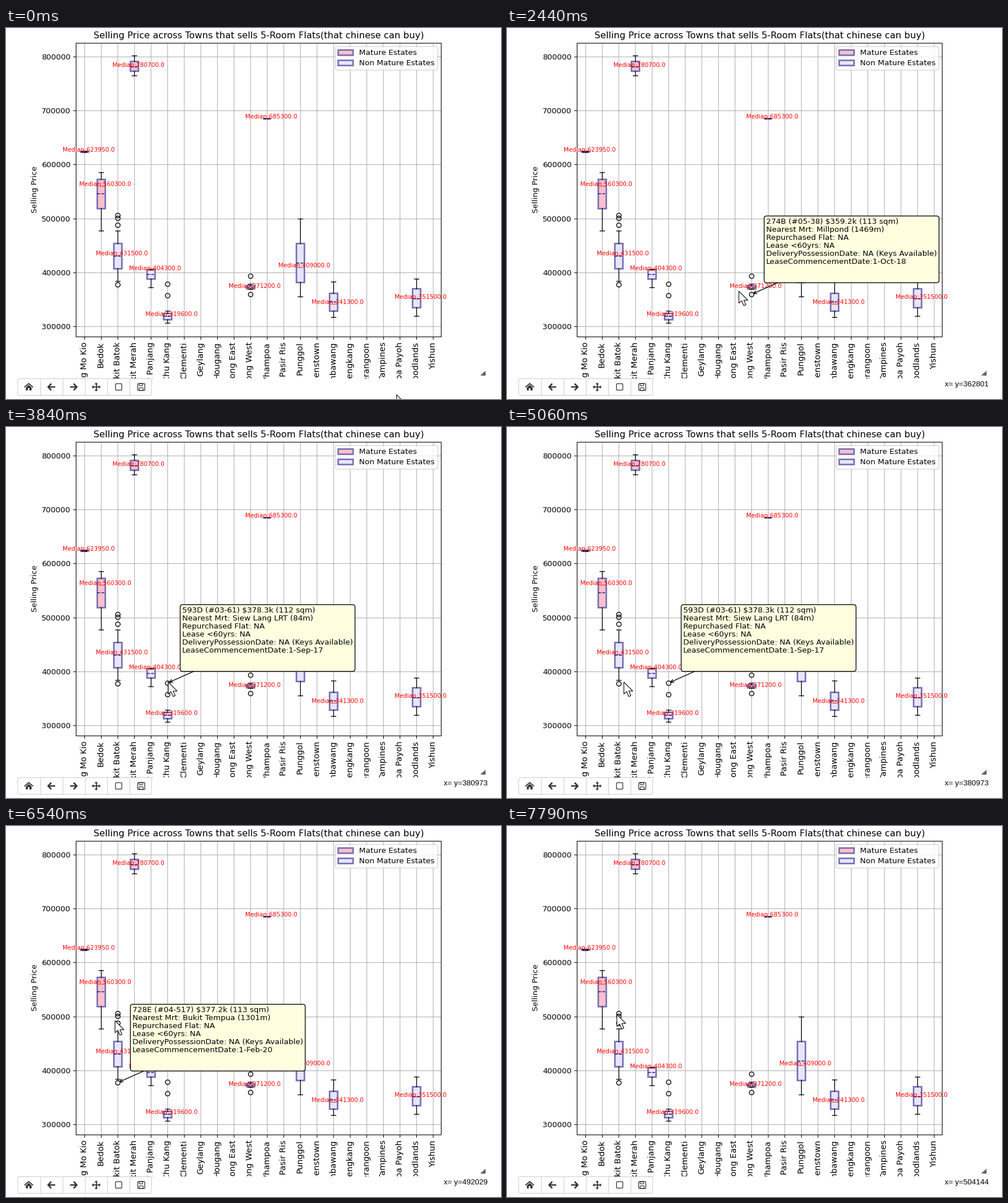
These frames come from a looping animation (865x648 px, 8 s). A matplotlib script:

```python
import numpy as np
import matplotlib.pyplot as plt
from matplotlib.animation import FuncAnimation
from matplotlib.patches import Circle, FancyBboxPatch, Patch, Polygon, Rectangle

W, H, DPI = 865, 648, 96
STEP, FRAMES = 80, 100
PX = 72 / DPI  # points per pixel
EDGE, DARK = "#7570b3", "#333333"

plt.rcParams["font.family"] = "DejaVu Sans"

TOWNS = ["Ang Mo Kio", "Bedok", "Bukit Batok", "Bukit Merah", "Bukit Panjang",
         "Choa Chu Kang", "Clementi", "Geylang", "Hougang", "Jurong East",
         "Jurong West", "Kallang/Whampoa", "Pasir Ris", "Punggol", "Queenstown",
         "Sembawang", "Sengkang", "Serangoon", "Tampines", "Toa Payoh",
         "Woodlands", "Yishun"]
MATURE = {"Ang Mo Kio", "Bedok", "Bukit Merah", "Kallang/Whampoa"}

# lowest, median and highest price in thousands, then any outliers
PRICES = {
    "Ang Mo Kio": (623, 623.95, 625),
    "Bedok": (477, 560.3, 585.5),
    "Bukit Batok": (384, 431.5, 477, 506.5, 501, 488, 377.2),
    "Bukit Merah": (765, 780.7, 802),
    "Bukit Panjang": (372, 404.3, 406.5),
    "Choa Chu Kang": (307, 319.6, 329, 378.3, 357),
    "Jurong West": (369, 371.2, 379, 394, 359.2),
    "Kallang/Whampoa": (685.2, 685.3, 685.4),
    "Punggol": (355, 409, 500),
    "Sembawang": (317, 341.3, 382.5),
    "Woodlands": (319.5, 351.5, 388),
}

# the pointer clicks a marker, and its note opens a little later
NOTES = [
    (1550, 1770, "Jurong West", 359.2, "274B (#05-38)", 113, "Millpond (1469m)", "1-Oct-18"),
    (3440, 3840, "Choa Chu Kang", 378.3, "593D (#03-61)", 112, "Siew Lang LRT (84m)", "1-Sep-17"),
    (5370, 5760, "Bukit Batok", 377.2, "728E (#04-517)", 113, "Bukit Tempua (1301m)", "1-Feb-20"),
]
CLICKS = [note[0] for note in NOTES] + [7500]

# pointer moves: from time, to time, resting place
START = (682, 640)
MOVES = [
    (70, 860, (438, 464)),
    (1060, 1300, (429, 462)),
    (2336, 2960, (283, 445)),
    (4420, 5140, (196.5, 445)),
    (6100, 6440, (190, 339.6)),
    (6640, 7090, (199, 333)),
    (7290, 7430, (191.5, 328.7)),
]


def pointer(t):
    pos = np.array(START, float)
    for begin, end, goal in MOVES:
        pos += (goal - pos) * np.clip((t - begin) / (end - begin), 0, 1)
    return pos


def status(t):
    y = pointer(t - STEP)[1]  # the readout lags one step behind
    if y > 539:
        return ""
    rows = round((463.7 - y) / 0.952)
    return f"x= y={360781.6 + 1009.592 * rows:.0f}"


fig = plt.figure(figsize=(W / DPI, H / DPI), dpi=DPI, facecolor="white")


def box_stats(low, med, high, *fliers):
    q1, q3 = (low + med) / 2, (med + high) / 2
    values = dict(whislo=low, q1=q1, med=med, mean=(q1 + q3) / 2, q3=q3, whishi=high)
    stats = {key: v * 1e3 for key, v in values.items()}
    return stats | {"fliers": [f * 1e3 for f in fliers]}


def draw_chart():
    ax = fig.add_axes([122.4 / W, 109 / H, 638 / W, 513.4 / H])
    places = [TOWNS.index(town) + 1 for town in PRICES]
    stats = [box_stats(*row) for row in PRICES.values()]
    parts = ax.bxp(stats, positions=places, widths=0.5, patch_artist=True,
                   showmeans=True, meanline=True, manage_ticks=False,
                   boxprops=dict(edgecolor=EDGE, linewidth=2),
                   medianprops=dict(color="tomato", linewidth=1),
                   meanprops=dict(color="navy", linestyle="--", linewidth=1))
    for town, x, row, box in zip(PRICES, places, stats, parts["boxes"]):
        box.set_facecolor("pink" if town in MATURE else "lavender")
        ax.text(x + 0.25, row["med"], f"Median:{row['med']:.1f}", color="red",
                size=7.8, ha="center", zorder=4)

    ax.set(xlim=(0.5, 22.5), ylim=(281100, 825700), ylabel="Selling Price")
    ax.set_xticks(range(1, 23), TOWNS, rotation=90, size=10.8)
    ax.set_yticks(range(300000, 800001, 100000))
    ax.set_title("Selling Price across Towns that sells 5-Room Flats"
                 "(that chinese can buy)", size=12)
    ax.grid(True)
    keys = [Patch(facecolor=c, edgecolor=EDGE, linewidth=2, label=name)
            for c, name in (("pink", "Mature Estates"), ("lavender", "Non Mature Estates"))]
    ax.legend(handles=keys, loc="upper right", labelspacing=0.37, borderpad=0.36)
    return ax


chart = draw_chart()

# pixel-space layer for everything above the chart
top = fig.add_axes([0, 0, 1, 1], zorder=10)
top.set(xlim=(0, W), ylim=(H, 0))
top.axis("off")


def stroke(xs, ys, width=1.0, color=DARK):
    top.plot(xs, ys, color=color, lw=width * PX, solid_capstyle="butt",
             solid_joinstyle="miter", zorder=3)


def shape(points):
    top.add_patch(Polygon(points, closed=True, fc=DARK, ec="none", zorder=3))


def rounded(x, y, w, h, r, **style):
    return top.add_patch(FancyBboxPatch((x, y), w, h, **style,
                                        boxstyle=f"round,pad=0,rounding_size={r}"))


def frame(x, y, w, h, width):
    rounded(x, y, w, h, 1.5, fc="none", ec=DARK, lw=width * PX, zorder=3)


def home_icon(x, y):
    stroke([x - 7.5, x, x + 7.5], [y + 0.5, y - 6, y + 0.5], 1.8)
    shape([(x - 5, y + 1), (x, y - 3.6), (x + 5, y + 1), (x + 5, y + 6), (x - 5, y + 6)])
    top.add_patch(Rectangle((x - 1.4, y + 2), 2.8, 4.2, fc="white", zorder=3.5))


def arrow_icon(x, y, d):
    stroke([x - 6.5 * d, x + 5 * d], [y, y], 2.4)
    stroke([x, x + 5.3 * d, x], [y - 5.8, y, y + 5.8], 2.6)


def pan_icon(x, y):
    for dx, dy in ((1, 0), (-1, 0), (0, 1), (0, -1)):
        stroke([x, x + 5 * dx], [y, y + 5 * dy], 1.8)
        shape([(x + 7.8 * dx, y + 7.8 * dy),
               (x + 4.6 * dx + 3 * dy, y + 4.6 * dy + 3 * dx),
               (x + 4.6 * dx - 3 * dy, y + 4.6 * dy - 3 * dx)])


def zoom_icon(x, y):
    frame(x - 5.5, y - 5.7, 11, 11.2, 1.3)


def save_icon(x, y):
    frame(x - 6, y - 6, 12.3, 12.2, 1.3)
    frame(x - 3.5, y - 6, 6, 4, 1.2)
    frame(x - 3.5, y + 1.5, 7, 4.7, 1.2)


def draw_toolbar():
    top.add_patch(Rectangle((0, 611.5), W, 40, fc="white", ec="none", zorder=1))
    stroke([0, W], [647.5, 647.5], 1, "#b8b8b8")
    rounded(20.5, 612.5, 234, 29, 3, fc="white", ec="#cccccc", lw=PX, zorder=2)
    icons = [home_icon, lambda x, y: arrow_icon(x, y, -1), lambda x, y: arrow_icon(x, y, 1),
             pan_icon, zoom_icon, save_icon]
    for k, icon in enumerate(icons):
        icon(39.7 + 39.3 * k, 627)
        if k:
            x = 20.5 + 39 * k
            stroke([x, x], [612.5, 641.5], 1, "#cccccc")
    for d in (0, 3, 5.5):  # resize grip
        stroke([830 + d, 838], [607, 600 + 0.9 * d], 1.5)


def make_note(town, price, flat, area, station, lease):
    x, y = chart.transData.transform((TOWNS.index(town) + 1, price * 1e3))
    y = H - y
    lines = [f"{flat} ${price}k ({area} sqm)", f"Nearest Mrt: {station}",
             "Repurchased Flat: NA", "Lease <60yrs: NA",
             "DeliveryPossessionDate: NA (Keys Available)", f"LeaseCommencementDate:{lease}"]
    arrow = top.annotate("", xy=(x, y), xytext=(x + 46, y - 20.5), zorder=4,
                         arrowprops=dict(arrowstyle="->", shrinkA=0, shrinkB=2,
                                         mutation_scale=10, lw=1))
    box = rounded(x + 22.5, y - 137, 305.5, 116.5, 4,
                  fc="lightyellow", ec="black", lw=1, zorder=5)
    texts = [top.text(x + 26, y - 123 + 13.85 * k, line, size=10, zorder=6)
             for k, line in enumerate(lines)]
    return [arrow, box, *texts]


draw_toolbar()
notes = [make_note(*row[2:]) for row in NOTES]
readout = top.text(842, 626.3, "", family="Liberation Sans", size=13.2 * PX,
                   ha="right", zorder=4)
ring = top.add_patch(Circle((0, 0), 17, fc="yellow", ec="none", alpha=0.47, zorder=8))
ARROW = np.array([(0, 0), (0, 21), (4.8, 16.7), (8.6, 25.3), (12.2, 23.7),
                  (8.6, 15.7), (15.6, 15.7)])
cursor = top.add_patch(Polygon(ARROW, closed=True, fc="white", ec="black",
                               lw=1.1 * PX, joinstyle="miter", zorder=9))


def update(i):
    t = (i + 0.5) * STEP
    tip = pointer(t)
    cursor.set_xy(ARROW + tip + 0.5)
    ring.set_center(tip)
    ring.set_visible(any(0 <= t - click < 90 for click in CLICKS))
    readout.set_text(status(t))
    for artists, row, next_click in zip(notes, NOTES, CLICKS[1:]):
        for artist in artists:
            artist.set_visible(row[1] <= t < next_click + 150)
    return []


anim = FuncAnimation(fig, update, frames=FRAMES, interval=STEP, init_func=lambda: update(0),
                     repeat=True, cache_frame_data=False)
plt.show()
```
